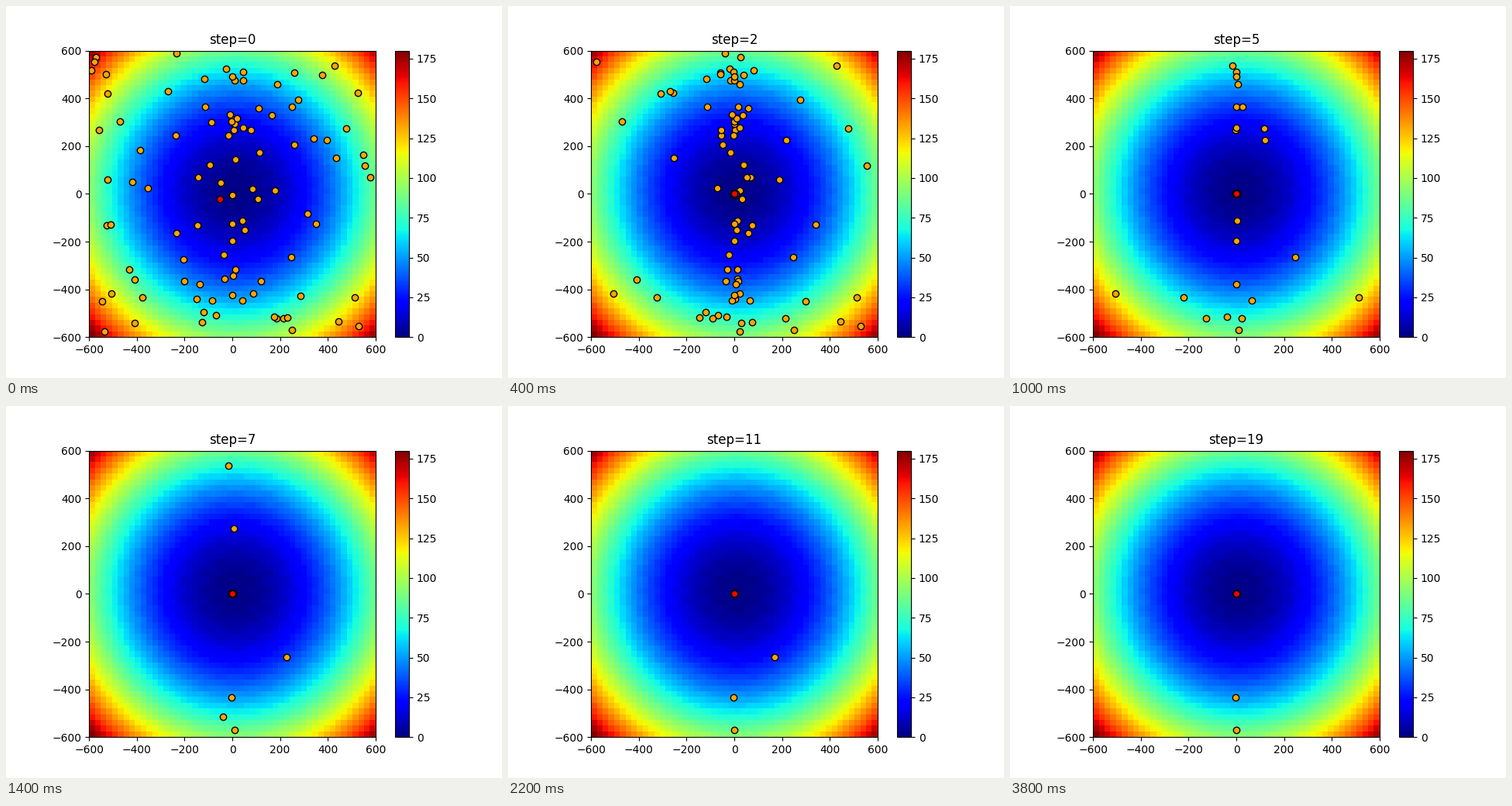
These frames come from a looping animation (640x480 px, 4000 ms). A matplotlib script:

```python
import numpy as np
import matplotlib.pyplot as plt
from matplotlib.animation import FuncAnimation

STEPS = 20
LIMIT = 600
BEES = 94

# Slowest bees: height, step of settling, x from each given step on
STRAGGLERS = [
    (537, 8, {0: 429, 3: 36, 5: -16}),
    (273, 8, {0: 477, 3: 117, 7: 6}),
    (-265, 15, {0: 247, 6: 227, 11: 170, 14: 95}),
    (-434, STEPS, {0: -377, 1: -325, 3: -220, 6: -2}),
    (-515, 8, {0: 175, 1: -32, 4: -39}),
    (-570, STEPS, {0: 250, 3: 172, 5: 10, 8: 0}),
]
BEST = [(-52, -21), (-42, -21), (0, 0)]

rng = np.random.default_rng(7)


def settle(xs, ys, end):
    """Send a bee to the hive, which tightens as time goes on."""
    spread = 6 * np.clip(1 - np.arange(STEPS) / 12, 0, 1)
    xs[end:] = rng.uniform(-1, 1) * spread[end:]
    ys[end:] = 0
    return xs, ys


def random_bee():
    """Hop towards the midline at a fixed height, then settle."""
    u = rng.uniform(-1, 1)
    xs = np.full(STEPS, LIMIT * np.sign(u) * abs(u) ** 1.85)
    ys = np.full(STEPS, rng.uniform(-LIMIT, LIMIT))
    for step in range(1, STEPS):
        if rng.random() < 0.45:
            xs[step:] *= rng.uniform(-0.8, 0.8)
    end = int(np.clip(np.round(rng.normal(4.2, 1.5)), 2, 7))
    return settle(xs, ys, end)


def straggler(y, end, moves):
    xs = np.zeros(STEPS)
    for step, x in moves.items():
        xs[step:] = x
    return settle(xs, np.full(STEPS, float(y)), end)


paths = np.array([random_bee() for _ in range(BEES)]
                 + [straggler(*bee) for bee in STRAGGLERS])

axis = np.linspace(-LIMIT, LIMIT, 51)
X, Y = np.meshgrid(axis, axis)
Z = 1 + (X**2 + Y**2) / 4000 - np.cos(X) * np.cos(Y / np.sqrt(2))

fig, ax = plt.subplots(figsize=(6.4, 4.8), dpi=100)
mesh = ax.pcolormesh(X, Y, Z[:-1, :-1], cmap="jet", shading="flat")
fig.colorbar(mesh, ax=ax)
ax.set_aspect("equal")
ax.set_xlim(-LIMIT, LIMIT)
ax.set_ylim(-LIMIT, LIMIT)
title = ax.set_title("step=0")
swarm, = ax.plot([], [], "o", color="orange", mec="black")
best, = ax.plot([], [], "o", color="red", mec="black")


def update(step):
    swarm.set_data(paths[:, 0, step], paths[:, 1, step])
    x, y = BEST[min(step, len(BEST) - 1)]
    best.set_data([x], [y])
    title.set_text(f"step={step}")
    return swarm, best, title


anim = FuncAnimation(fig, update, frames=STEPS, interval=200, repeat=True,
                     repeat_delay=0, init_func=lambda: update(0))
plt.show()
```
